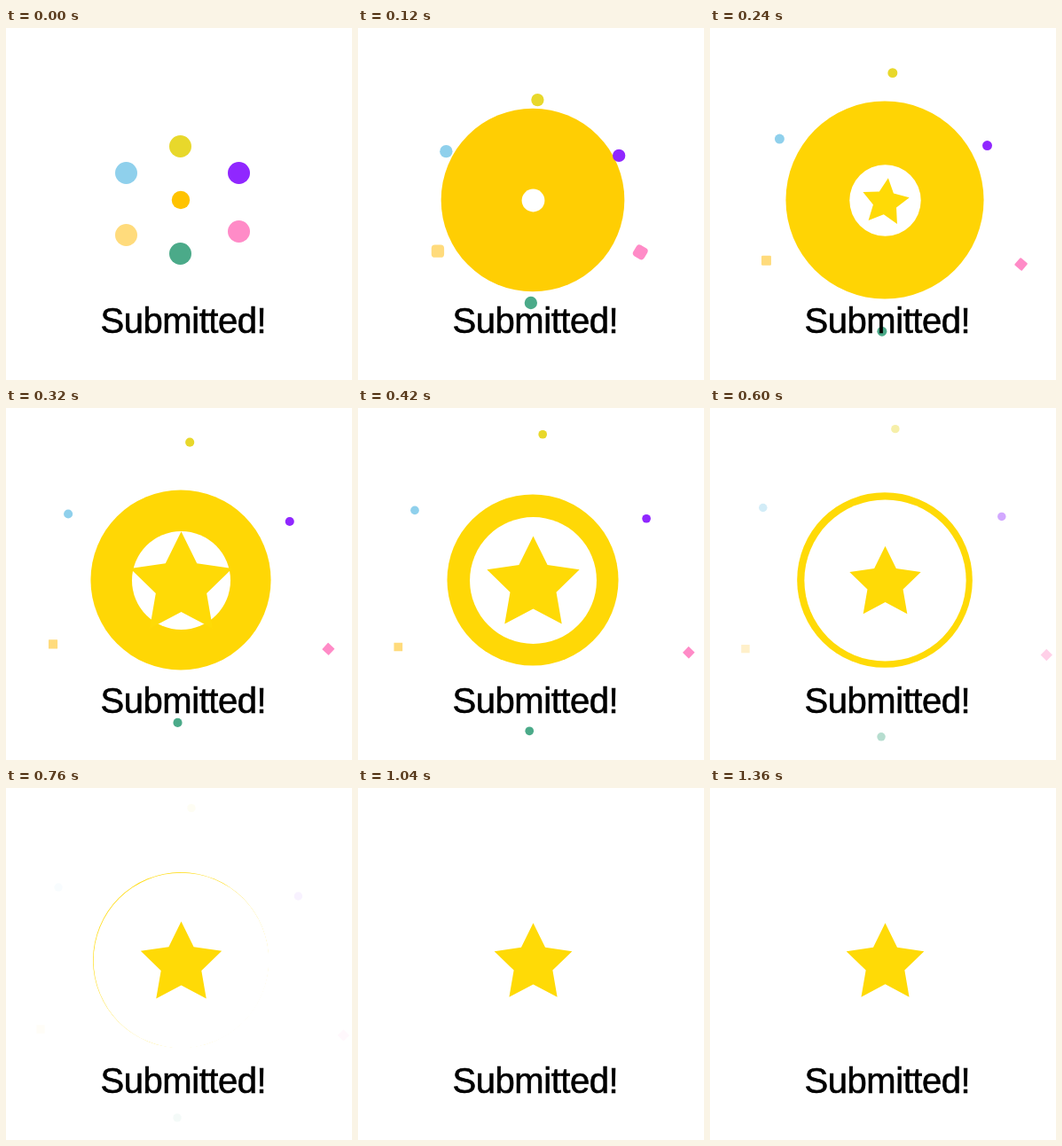
An HTML page with a canvas for the animation above (2480 ms loop, 390 px wide and 397 px high).

```html
<!DOCTYPE html>
<html lang="en">
<head>
<meta charset="utf-8">
<title>Submitted</title>
<style>
  html, body { margin: 0; width: 100%; height: 100%; overflow: hidden; background: #fff; }
  canvas { display: block; }
  p {
    position: absolute; left: 106.5px; top: 309.5px; margin: 0;
    font: 40px/40px "Liberation Sans", Arial, sans-serif; color: #000; white-space: nowrap;
    letter-spacing: -0.45px; -webkit-text-stroke: 0.6px #000;
  }
</style>
</head>
<body>
<canvas width="390" height="397"></canvas>
<p>Submitted!</p>
<script>
const ctx = document.querySelector('canvas').getContext('2d');
const LOOP = 2480, STEP = 20, RAD = Math.PI / 180;

// colour, start, end, and for squares the final turn in degrees
const bits = [
  { color: '#e8d82b', from: [196.5, 133.5], to: [209, 22.5] },
  { color: '#8fd0ec', from: [135.5, 163.5], to: [59, 112] },
  { color: '#9027ff', from: [262.5, 163.5], to: [329.5, 122] },
  { color: '#ffdb7c', from: [135.5, 233.5], to: [39, 272], turn: 0 },
  { color: '#ff8bc7', from: [262.5, 229.5], to: [380.5, 279], turn: 45 },
  { color: '#4baa89', from: [196.5, 254.5], to: [193, 372] }
];

const clamp = x => Math.min(1, Math.max(0, x));
const mix = (a, b, k) => a + (b - a) * k;
const outQuint = x => 1 - (1 - clamp(x)) ** 5;

// Damped spring from 0 to 1; decay per ms, speed in degrees per ms
const spring = (t, decay, speed) =>
  t <= 0 ? 0 : 1 - Math.exp(-decay * t) * Math.cos(speed * t * RAD);

function disc(x, y, r, color) {
  ctx.fillStyle = color;
  ctx.beginPath();
  ctx.arc(x, y, r, 0, 2 * Math.PI);
  ctx.fill();
}

function drawRing(t) {
  if (t >= 800) return;
  const k = outQuint(t / 1000);
  const color = `rgb(255, ${mix(195, 218, k)}, ${mix(0, 6, k)})`;
  disc(197, 194, 98.8 * spring(t + 12, 0.0081, 0.74), color);
  const open = clamp((t - 70) / 745);
  disc(197.5, 194.5, 99.4 * (1 - (1 - open) ** 2), '#fff');
}

function drawBits(t) {
  const move = outQuint(t / 1000), shrink = 1 - Math.exp(-0.0096 * t);
  const size = mix(25, 9.4, shrink);
  ctx.globalAlpha = clamp((940 - t) / 460) ** 3;
  for (const { color, from, to, turn } of bits) {
    ctx.save();
    ctx.translate(mix(from[0], to[0], move), mix(from[1], to[1], move));
    if (turn) ctx.rotate(turn * shrink * RAD);
    const corner = turn === undefined ? size / 2 : 12.5 * (1 - shrink);
    ctx.fillStyle = color;
    ctx.beginPath();
    ctx.roundRect(-size / 2, -size / 2, size, size, corner);
    ctx.fill();
    ctx.restore();
  }
  ctx.globalAlpha = 1;
}

function drawStar(t) {
  const scale = spring(t - 180, 0.00543, 0.941);
  if (!scale) return;
  ctx.save();
  ctx.translate(197.5, 194);
  ctx.scale(scale, scale);
  ctx.translate(0, 4.4);
  ctx.rotate(14 * clamp((300 - t) / 120) * RAD);
  ctx.fillStyle = '#ffda06';
  ctx.beginPath();
  for (let i = 0; i < 10; i++) {
    const r = i % 2 ? 23 : 46.1, a = i * 36 * RAD;
    ctx.lineTo(r * Math.sin(a), -r * Math.cos(a));
  }
  ctx.fill();
  ctx.restore();
}

let start;
function frame(now) {
  start ??= now;
  const t = Math.min(1360, Math.floor((now - start) % LOOP / STEP) * STEP);
  ctx.clearRect(0, 0, 390, 397);
  drawRing(t);
  drawBits(t);
  drawStar(t);
  requestAnimationFrame(frame);
}
requestAnimationFrame(frame);
</script>
</body>
</html>
```
